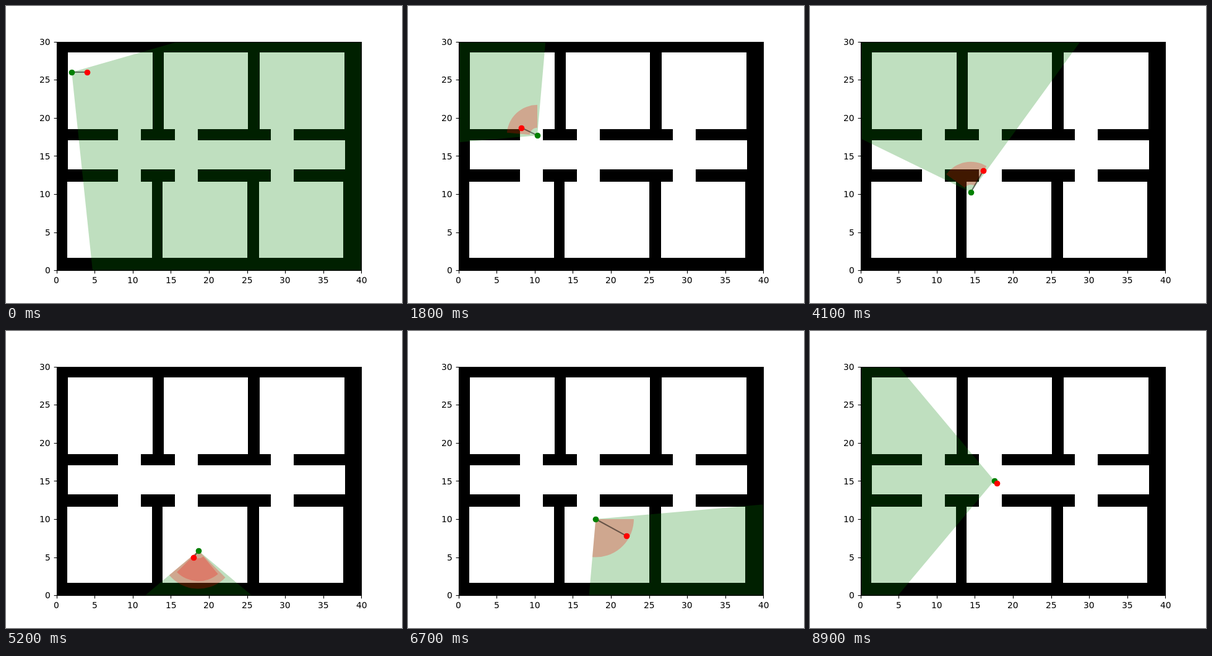
Animation of 640 by 480 pixels, one loop 9000 ms. Source, as an HTML page with a canvas:

```html
<!DOCTYPE html>
<html lang="en">
<head>
<meta charset="utf-8">
<title>Floor plan pursuit</title>
<style>
  html, body { margin: 0; width: 100%; height: 100%; overflow: hidden; background: #fff; }
  canvas { display: block; }
</style>
</head>
<body>
<canvas id="stage" width="640" height="480"></canvas>
<script>
const ctx = document.getElementById('stage').getContext('2d');
const UNIT = 12.32, LOOP = 9000, STEP = 100;
const TURN_RATE = 225; // degrees per second
const RED = 'rgba(255,0,0,.25)', GREEN = 'rgba(0,128,0,.25)';
const px = x => 81.6 + UNIT * x;
const py = y => 427.2 - UNIT * y;
const snap = v => Math.floor(v + 0.5) + 0.5;

// Waypoints in plan units; the turn towards each heading starts at its own time
const route = [
  { t: 0, eye: [2, 26], goal: [4, 26], heading: -34, turn: 0 },
  { t: 1.8, eye: [10.34, 17.7], goal: [8.23, 18.72], heading: 135, turn: 0 },
  { t: 3.2, eye: [13.83, 13.29], goal: [10.46, 14.79], heading: 180, turn: 3 },
  { t: 4.1, eye: [14.48, 10.24], goal: [16.1, 13.08], heading: 104, turn: 3.6 },
  { t: 5.2, eye: [18.62, 5.86], goal: [17.97, 4.97], heading: -90, turn: 4.2 },
  { t: 6.7, eye: [18, 10], goal: [22.03, 7.8], heading: -45, turn: 6 },
  { t: 8.9, eye: [17.55, 15.05], goal: [17.9, 14.7], heading: 180, turn: 7.55 }
];

function pose(t) {
  const i = Math.max(1, route.findIndex(p => p.t >= t));
  const a = route[i - 1], b = route[i];
  const u = (t - a.t) / (b.t - a.t);
  const mix = (p, q) => p.map((v, j) => v + (q[j] - v) * u);
  const swing = b.heading - a.heading;
  const turned = Math.min(Math.abs(swing), TURN_RATE * Math.max(0, t - b.turn));
  return {
    eye: mix(a.eye, b.eye),
    goal: mix(a.goal, b.goal),
    heading: a.heading + Math.sign(swing) * turned
  };
}

function box(x0, y0, x1, y1, color) {
  ctx.fillStyle = color;
  ctx.fillRect(x0, y0, x1 - x0, y1 - y0);
}

function drawPlan() {
  box(0, 0, 640, 480, '#fff');
  box(82, 58, 575, 428, '#000');
  box(100, 217, 548, 264, '#fff');
  for (const [l, r] of [[100, 237], [255, 391], [410, 547]]) box(l, 75, r, 199, '#fff');
  for (const [l, r] of [[99, 236], [253, 390], [409, 545]]) box(l, 284, r, 407, '#fff');
  for (const door of [181, 273, 428]) box(door, 199, door + 37, 284, '#fff');
}

function line(x0, y0, x1, y1, width, color) {
  ctx.lineWidth = width;
  ctx.strokeStyle = color;
  ctx.beginPath();
  ctx.moveTo(x0, y0);
  ctx.lineTo(x1, y1);
  ctx.stroke();
}

function label(text, right, baseline) {
  ctx.fillText(text, Math.round(right - ctx.measureText(text).width), baseline);
}

function drawAxes() {
  ctx.lineWidth = 1.11;
  ctx.strokeStyle = ctx.fillStyle = '#000';
  ctx.strokeRect(82.5, 58.5, 492, 369);
  ctx.font = '13.89px "DejaVu Sans", sans-serif';
  for (let v = 0; v <= 40; v += 5) {
    const x = snap(px(v));
    line(x, 427.5, x, 432.4, 1.11, '#000');
    label(v, px(v) + ctx.measureText(v).width / 2, 448);
  }
  for (let v = 0; v <= 30; v += 5) {
    const y = snap(py(v));
    line(77.6, y, 82.5, y, 1.11, '#000');
    label(v, 71.9, Math.round(py(v) + 5.2));
  }
}

// Ring sector spanning lo..hi degrees around the heading
function sector(x, y, heading, lo, hi, inner, outer, color) {
  const from = -(heading + lo) * Math.PI / 180;
  const to = -(heading + hi) * Math.PI / 180;
  ctx.fillStyle = color;
  ctx.beginPath();
  ctx.arc(x, y, outer * UNIT, from, to, true);
  if (inner) ctx.arc(x, y, inner * UNIT, to, from);
  else ctx.lineTo(x, y);
  ctx.fill();
}

function dot(x, y, color) {
  ctx.fillStyle = color;
  ctx.beginPath();
  ctx.arc(snap(x), snap(y), 4.86, 0, 2 * Math.PI);
  ctx.fill();
}

function draw(t) {
  const { eye, goal, heading } = pose(t);
  const x = px(eye[0]), y = py(eye[1]);
  const gx = px(goal[0]), gy = py(goal[1]);
  drawPlan();
  ctx.save();
  ctx.beginPath();
  ctx.rect(82, 58, 493, 370);
  ctx.clip();
  sector(x, y, heading, -50, 50, 0, 100, GREEN);
  if (t >= 1 && t <= 6) sector(x, y, heading, -45, 40, 1, 4, RED);
  if (t > 5 && t <= 7) sector(x, y, heading, -50, 45, 0, 5, RED);
  ctx.restore();
  line(x, y, gx, gy, 2.08, 'rgba(0,0,0,.5)');
  dot(x, y, '#008000');
  dot(gx, gy, '#f00');
  drawAxes();
}

const start = performance.now();
function tick() {
  const ms = (performance.now() - start) % LOOP;
  draw(Math.floor(ms / STEP) * STEP / 1000);
  requestAnimationFrame(tick);
}
tick();
</script>
</body>
</html>
```
